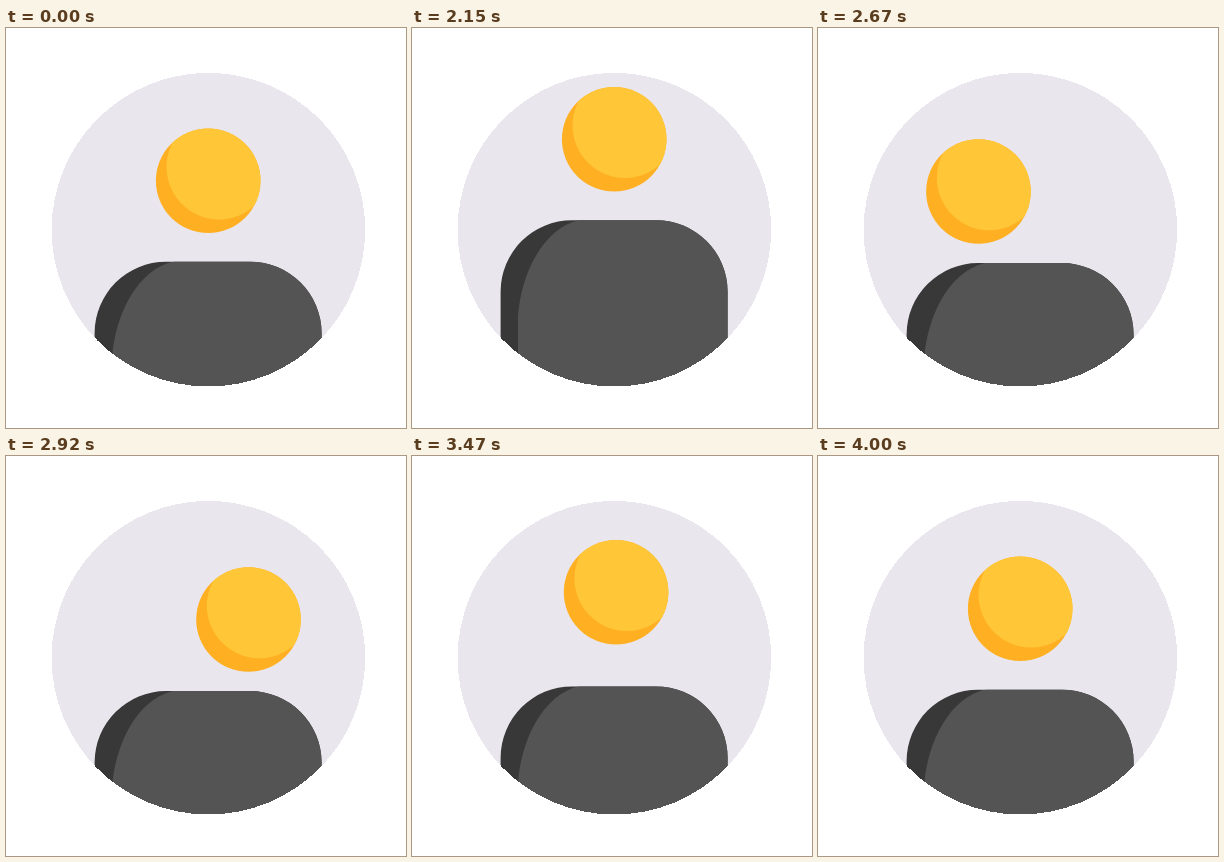
Recreate the animation shown at these times as an HTML page. Size 400 px wide and 400 px high, loop 4020 ms.

```html
<!DOCTYPE html>
<html lang="en">
<head>
<meta charset="utf-8">
<title>Avatar</title>
<style>
  html, body { margin: 0; width: 100%; height: 100%; overflow: hidden; background: #fff; }
  svg { display: block; width: 100vw; height: 100vh; }
</style>
</head>
<body>
<svg viewBox="0 0 400 400">
  <defs>
    <clipPath id="face"><circle cx="202.2" cy="152.7" r="52.3"/></clipPath>
    <clipPath id="torso"><path d="M88.6 480V305A71.5 71.5 0 0 1 160 233.7H244A71.5 71.5 0 0 1 315.6 305V480Z"/></clipPath>
  </defs>
  <rect width="400" height="400" fill="#eae6ed"/>
  <g id="body">
    <g clip-path="url(#torso)">
      <rect x="80" y="225" width="245" height="260" fill="#383838"/>
      <path d="M169 233C131 241 109 287 106 330V480H330V233Z" fill="#545454"/>
    </g>
  </g>
  <g id="head">
    <circle cx="202.2" cy="152.7" r="52.3" fill="#ffb022"/>
    <circle cx="213" cy="139" r="52.4" fill="#ffc738" clip-path="url(#face)"/>
  </g>
  <!-- white surround with a round window -->
  <path d="M0 0H400V400H0ZM45.6 201.7a156.8 156.8 0 0 0 313.6 0a156.8 156.8 0 0 0 -313.6 0Z"
        fill="#fff" fill-rule="evenodd" shape-rendering="crispEdges"/>
</svg>
<script>
  const LOOP = 4020, HOLD = 2020, STEP = 25;
  const START = 2000, PEAK1 = 2170, PEAK2 = 3640, END = 3990;
  const LEFT = 2660, RIGHT = 2946, CENTRE = 3552;
  const HEIGHT = 43.8, SWING = 42;

  // Eased progress from 0 at time a to 1 at time b
  const ramp = (t, a, b) => {
    const p = Math.min(1, Math.max(0, (t - a) / (b - a)));
    return (1 - Math.cos(Math.PI * p)) / 2;
  };

  // Two jumps, with a rest slightly below the starting level between them
  function leap(t, land, launch, sink) {
    const down = ramp(t, PEAK1, land), up = ramp(t, launch, PEAK2);
    const air = ramp(t, START, PEAK1) - down + up - ramp(t, PEAK2, END);
    return sink * (down - up) - HEIGHT * air;
  }

  const sway = t =>
    SWING * (2 * ramp(t, LEFT, RIGHT) - ramp(t, PEAK1, LEFT) - ramp(t, RIGHT, CENTRE));

  const head = document.getElementById("head");
  const body = document.getElementById("body");
  const move = (el, x, y) => el.setAttribute("transform", `translate(${x.toFixed(2)} ${y.toFixed(2)})`);

  function draw() {
    const now = performance.now() % LOOP;
    const t = now < HOLD ? 0 : HOLD + Math.floor((now - HOLD) / STEP) * STEP;
    move(head, sway(t), leap(t, 2440, 3300, 10.8));
    move(body, 0, leap(t, 2455, 3425, 1.4));
    requestAnimationFrame(draw);
  }
  draw();
</script>
</body>
</html>
```
